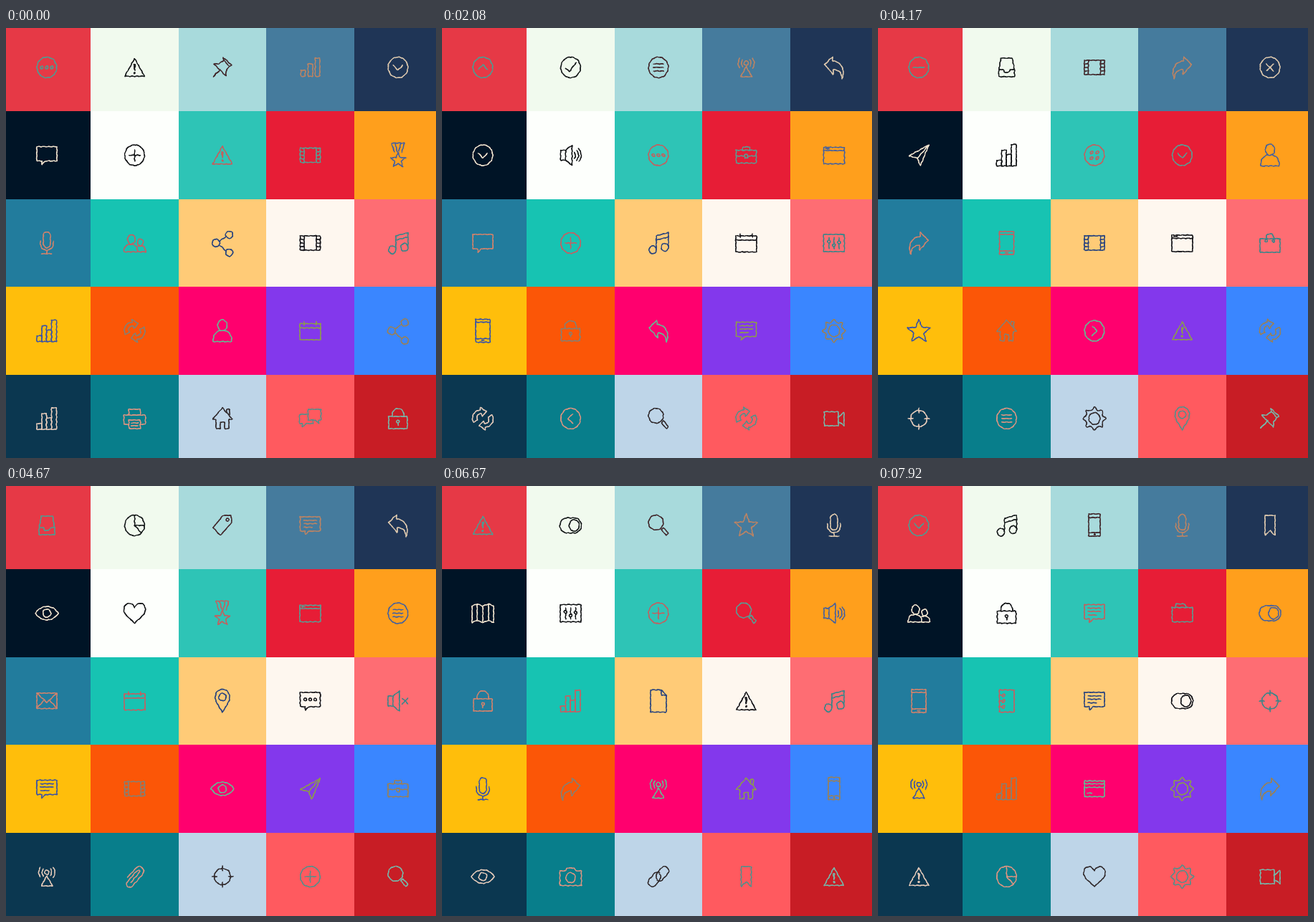
Animation, 600 px wide and 600 px high, one loop 8000 ms. Source, as an HTML page with a canvas:

```html
<!DOCTYPE html>
<html lang="en">
<head>
<meta charset="utf-8">
<title>Icon grid</title>
<style>
html, body { margin: 0; height: 100%; overflow: hidden; }
canvas { display: block; width: 100vw; height: 100vh; }
</style>
</head>
<body>
<canvas id="stage" width="600" height="600"></canvas>
<script>
const ctx = document.getElementById('stage').getContext('2d');
const LOOP = 8000, HOLD = 1500, LEAD = 80;
const EDGES_X = [0, 118, 241, 363, 486, 600];
const EDGES_Y = [0, 116, 239, 361, 484, 600];
const CELL = 122.5, FIRST_X = 57, FIRST_Y = 55;

// background and ink of each cell, row by row
const COLORS = `
e63946 4f9c92|f1faee 15191a|a8dadc 40262a|457b9d bb8465|1f3556 dcc8ae
001426 f3e5d0|fdfffc 101214|2ec4b6 c4605f|e71d36 5b9c93|ff9f1c 4561a0
227c9d d2836c|17c3b2 c75f62|ffcb77 27437f|fef7ef 15151a|fe6d73 39868a
ffbe0b 3953a8|fb5607 858075|ff006e 5fbf95|8338ec 8d9c4d|3a86ff 98805a
0b3750 e5cbbb|087e8b de9582|bed5e8 30292b|ff5a5f 558f8b|c81d25 78b6a9`
  .trim().split(/[|\n]/).map(pair => pair.split(' ').map(c => '#' + c));

const SCENES = [
  `dots alert pin bars down  speech plus alert film medal  mic users share film music
   steps refresh user calendar share  steps printer home chats lock`,
  `up check menu antenna back  down speaker dots briefcase window  speech plus music calendar sliders
   phone lock back note gear  refresh left search refresh video`,
  `minus inbox film forward close  send steps button down user  forward phone film window bag
   star home right alert refresh  target menu gear marker pin`,
  `inbox pie tag note back  eye heart medal window menu  mail calendar marker chat mute
   note film eye send briefcase  antenna clip target plus search`,
  `alert toggle search star mic  map sliders plus search speaker  lock steps doc alert music
   mic forward antenna home slim  eye camera link bookmark alert`,
  `down music slim mic bookmark  users lock note folder toggle  phone notebook note toggle target
   antenna steps cards gear forward  alert pie heart gear video`
].map(s => s.trim().split(/\s+/));

// path builders
const oval = (x, y, rx, ry = rx) =>
  `M${x - rx} ${y}a${rx} ${ry} 0 1 1 ${2 * rx} 0a${rx} ${ry} 0 1 1 ${-2 * rx} 0z`;
const rect = (x, y, w, h) => `M${x} ${y}h${w}v${h}h${-w}z`;
const flip = (path, sx, sy) =>
  path.replace(/(-?[\d.]+)[ ,]*(-?[\d.]+)/g, (_, x, y) => `${x * sx} ${y * sy} `);
const both = path => path + flip(path, -1, 1);
const polar = (n, point) => {
  const pts = Array.from({ length: n }, (_, i) => {
    const [angle, r] = point(i);
    return `${(Math.sin(angle) * r).toFixed(2)} ${(-Math.cos(angle) * r).toFixed(2)}`;
  });
  return 'M' + pts.join('L') + 'z';
};
const starAt = (cy, r) => polar(10, i => [i * Math.PI / 5, i % 2 ? r * .43 : r])
  .replace(/ (-?[\d.]+)/g, (_, y) => ' ' + (+y + cy));
const cog = polar(32, i => [(i - 1.5 + (i % 4 === 1 ? .3 : i % 4 === 2 ? -.3 : 0)) * Math.PI / 16,
  i % 4 === 1 || i % 4 === 2 ? 16 : 12.3]);

const ring = oval(0, 0, 13.7, 14.4);
const threeDots = y => [-7, 0, 7].map(x => oval(x, y, 1.9)).join('');
const bubble = 'M-14-12H14V8H-2L-7 13V8H-14z';
const backArrow = 'M-13-4L-2-15L-2-9C8-9 17 2 11 16C11 7 6 3-1 3L-1 10z';
const turn = 'M-13 5C-17-3-12-12-3-12L-4-16L5-10L-1-3L-2-7C-8-7-10-2-7 2z';
const chain = 'M-1 4C-6 0-2-5 4-12C9-18 18-10 13-4L6 4C3 7 0 7-2 5';
const cone = 'M-14-7L-7-7L2-14L2 14L-7 7L-14 7zM-7-7V7';

const ICONS = {
  dots: ring + threeDots(0),
  alert: 'M0-12.5L13.7 12.3H-13.7zM-1-4.5L0 4L1-4.5z' + oval(0, 7.5, .9),
  pin: 'M1-14L13-3L9-1L5 5L5 12L-12-5L-5-5L2-10zM2-10L9-2M-3 3L-13 13L-5 5',
  bars: rect(-13, 4, 6, 8.5) + rect(-3, -5, 6.5, 17.5) + rect(7, -13, 6.3, 25.5),
  steps: rect(-14, 7, 7, 8) + rect(-7, -7, 6.5, 22) + rect(-.5, -1, 7, 16) + rect(6.5, -15, 7, 30),
  down: ring + 'M-6.5-3L0 4L6.5-3',
  up: ring + 'M-6.5 3L0-4L6.5 3',
  left: ring + 'M3-6.5L-4 0L3 6.5',
  right: ring + 'M-3-6.5L4 0L-3 6.5',
  speech: bubble,
  chat: bubble + threeDots(-2),
  note: bubble + 'M-9-7H9M-9-2.5H9M-9 2.5H3',
  plus: ring + 'M-8 0H8M0-8V8',
  minus: ring + 'M-8 0H8',
  close: ring + 'M-5-5L5 5M5-5L-5 5',
  check: ring + 'M-7 1L-2 6L8-7',
  menu: ring + 'M-7-5H7M-7 0H7M-7 5H7',
  button: ring + [[-4, -4], [4, -4], [-4, 4], [4, 4]].map(p => oval(...p, 1.9)).join(''),
  pie: ring + 'M0-14V0H13.5M0 0L9 10',
  film: rect(-14, -10, 28, 20) + 'M-8.5-10V10M8.5-10V10M-14-5H-9M-14 0H-9M-14 5H-9M9-5H14M9 0H14M9 5H14',
  medal: 'M-5-4L-9-17H9L5-4M-4-17L-1-5M4-17L1-5' + starAt(7, 11),
  star: starAt(1, 17),
  mic: 'M-5-10a5 5.5 0 0 1 10 0V1a5 5.5 0 0 1-10 0zM-9-3V1a9 9 0 0 0 18 0V-3M0 10V15M-7 15H7',
  users: oval(-4.5, -5, 5.3, 6.5) + 'M-15 12.3C-15 3-10 2-5 2S4 4 4 12.3z' + oval(8, -1, 4, 4.7) +
    'M4 5C7 3 15.5 3 15.5 12.3H4',
  share: oval(-9, 0, 5.3) + oval(9.5, -11.5, 5) + oval(9.5, 13.5, 5) + 'M-4-2.5L5-9M-4 3L5 11',
  music: oval(-8, 9.5, 5, 5.5) + oval(9, 6, 5, 5.5) + 'M-3 9V-10L14-14.5V6M-3-4L14-8.5',
  refresh: turn + flip(turn, -1, -1),
  user: oval(0, -7.7, 6.5, 7.8) + 'M-3-1C-8 2-13 3-13 15L13 15C13 3 8 2 3-1',
  calendar: rect(-14.5, -10, 29, 22.5) + 'M-14.5-4H14.5M-8.5-13V-8M8.5-13V-8',
  printer: 'M-8-5V-13H8V-5M-8 8H-15V-5H15V8H8' + rect(-8, 2, 16, 12) + 'M-5 6H5M-5 10H5',
  home: 'M0-15L14 1H9V14H3V5H-3V14H-9V1H-14zM6-9V-13H10V-5',
  chats: 'M-3-7V-13H15V2H12V7L7 2H-3V-7M-3-6H-15V7H-11V12L-6 7H4V2',
  lock: rect(-13, -3, 26, 17) + 'M-8-3V-6a8 8 0 0 1 16 0V-3M0 6V9' + oval(0, 4, 1.9),
  antenna: 'M0-1L8 13H-8z' + oval(0, -6, 3) + both('M-5-11C-7-8-7-4-5-1') + both('M-9-13C-12-8-12-4-9 1'),
  back: backArrow,
  forward: flip(backArrow, -1, 1),
  speaker: cone + 'M5-4C7-2 7 3 5 5M8-7C12-3 12 4 8 7M11-9C16-4 16 5 11 9',
  mute: cone + 'M6-4L14 4M14-4L6 4',
  briefcase: rect(-14, -7, 28, 18) + 'M-5-7V-11.5H5V-7M-14 1H-3M3 1H14' + rect(-2, -1, 4, 5),
  window: rect(-14.5, -11, 29, 23) + 'M-14.5-6.5H14.5M-12-9H-7',
  sliders: rect(-14.5, -12, 29, 24) + 'M-7-8V-4M-7 0V8M0-8V1M0 5V8M7-8V-3M7 1V8' +
    oval(-7, -2, 2) + oval(0, 3, 2) + oval(7, -1, 2),
  phone: rect(-10, -16, 20, 32) + 'M-10-12H10M-10 11H10M-2 13.5H2',
  slim: rect(-8, -16, 16, 31) + 'M-8-11H8M-8 10H8' + oval(0, 12.5, .8),
  gear: cog + oval(0, 0, 7.8, 8.2),
  search: oval(-3.5, -4, 10.3) + 'M4 6L7 3L14 11L11 14z',
  video: rect(-13.5, -9.5, 19.5, 19.5) + 'M6-2L14-9V10L6 4',
  inbox: 'M-8-13H8L11 5V13H-11V5zM-11 3H-5L-3 7H3L5 3H11',
  send: 'M14-14.5L2 15L-2 4L-14 1zM14-14.5L-2 4',
  bag: rect(-14, -6, 28, 19) + 'M-5-4C-8-16 8-16 5-4' + oval(-5, -3, 1.8) + oval(5, -3, 1.8),
  target: oval(0, 0, 11.3) + 'M0-15V-8M0 8V15M-15 0H-8M8 0H15',
  marker: 'M0 16C-4 8-10 2-10-5C-10-20 10-20 10-5C10 2 4 8 0 16z' + oval(0, -5.5, 5.2),
  tag: 'M-13 3L1-14L12-14L13-4L-3 14z' + oval(7, -8, 2),
  eye: 'M-16 0C-8-12.5 8-12.5 16 0C8 12.5-8 12.5-16 0z' + oval(0, 0, 5.5),
  heart: 'M0-8C4-17 15-15 15-5C15 3 5 8 0 14C-5 8-15 3-15-5C-15-15-4-17 0-8z',
  mail: rect(-14, -11, 28, 21.5) + 'M-14-11L0 2L14-11M-14 10L-4-1M14 10L4-1',
  clip: 'M-5 8L6-5C9-9 5-10 2-7L-9 6C-15 13-8 18-3 13L11-3C16-10 8-18 2-12L-10 1',
  toggle: 'M-5-10.5H5a10 10.5 0 0 1 0 21H-5a10 10.5 0 0 1 0-21z' + oval(5, 0, 7, 8),
  map: 'M-15-10L-8-13L0-10L8-13L15-10V13L8 10L0 13L-8 10L-15 13zM-8-13V10M0-10V13M8-13V10',
  doc: 'M-11-15.5H4L11-8V15.5H-11zM4-15.5V-8H11',
  camera: 'M-15-8H-7L-5-12H5L7-8H15V12.5H-15z' + oval(0, 1.5, 6.5, 7),
  link: chain + flip(chain, -1, -1),
  bookmark: 'M-7-14H7V14L0 7L-7 14z',
  folder: rect(-14, -8, 28.5, 20) + 'M-10-8L-9-13H3L6-8',
  notebook: rect(-10, -15.5, 20.5, 31) + [-8, 0, 8].map(y => oval(-4.5, y, 1.9) + `M-11 ${y}H-6`).join(''),
  cards: rect(-14, -7, 28, 18) + 'M-14-2H14M-14-7V-11H14V-7M-10 6H-3'
};

const probe = document.createElementNS('http://www.w3.org/2000/svg', 'path');

function random(seed) {
  return () => (seed = (seed * 16807) % 2147483647) / 2147483647;
}

// strokes with a slightly shaky hand and uneven pressure
function sketch(path, seed) {
  const rnd = random(seed);
  for (const part of path.match(/M[^M]+/g)) {
    probe.setAttribute('d', part);
    const length = probe.getTotalLength();
    const steps = Math.max(2, Math.ceil(length / 1.3));
    let last;
    for (let i = 0; i <= steps; i++) {
      const { x, y } = probe.getPointAtLength(length * i / steps);
      const point = [
        x + Math.sin(y * .9 + seed) * .3 + (rnd() - .5) * .35,
        y + Math.sin(x * .9 + seed * 2) * .3 + (rnd() - .5) * .35
      ];
      if (last) {
        ctx.lineWidth = 1.05 + rnd() * .65;
        ctx.beginPath();
        ctx.moveTo(...last);
        ctx.lineTo(...point);
        ctx.stroke();
      }
      last = point;
    }
  }
}

function drawScene(names) {
  ctx.lineCap = ctx.lineJoin = 'round';
  names.forEach((name, i) => {
    const col = i % 5, row = Math.floor(i / 5);
    const [back, ink] = COLORS[i];
    const x = EDGES_X[col], y = EDGES_Y[row];
    ctx.fillStyle = back;
    ctx.fillRect(x, y, EDGES_X[col + 1] - x, EDGES_Y[row + 1] - y);
    ctx.save();
    ctx.translate(FIRST_X + col * CELL, FIRST_Y + row * CELL);
    ctx.strokeStyle = ink;
    sketch(ICONS[name], i * 37 + 11);
    ctx.restore();
  });
}

let shown = -1;
function tick() {
  const time = performance.now() % LOOP;
  const scene = Math.floor((time + LEAD) / HOLD);
  if (scene !== shown) {
    drawScene(SCENES[scene]);
    shown = scene;
  }
  requestAnimationFrame(tick);
}
tick();
</script>
</body>
</html>
```
